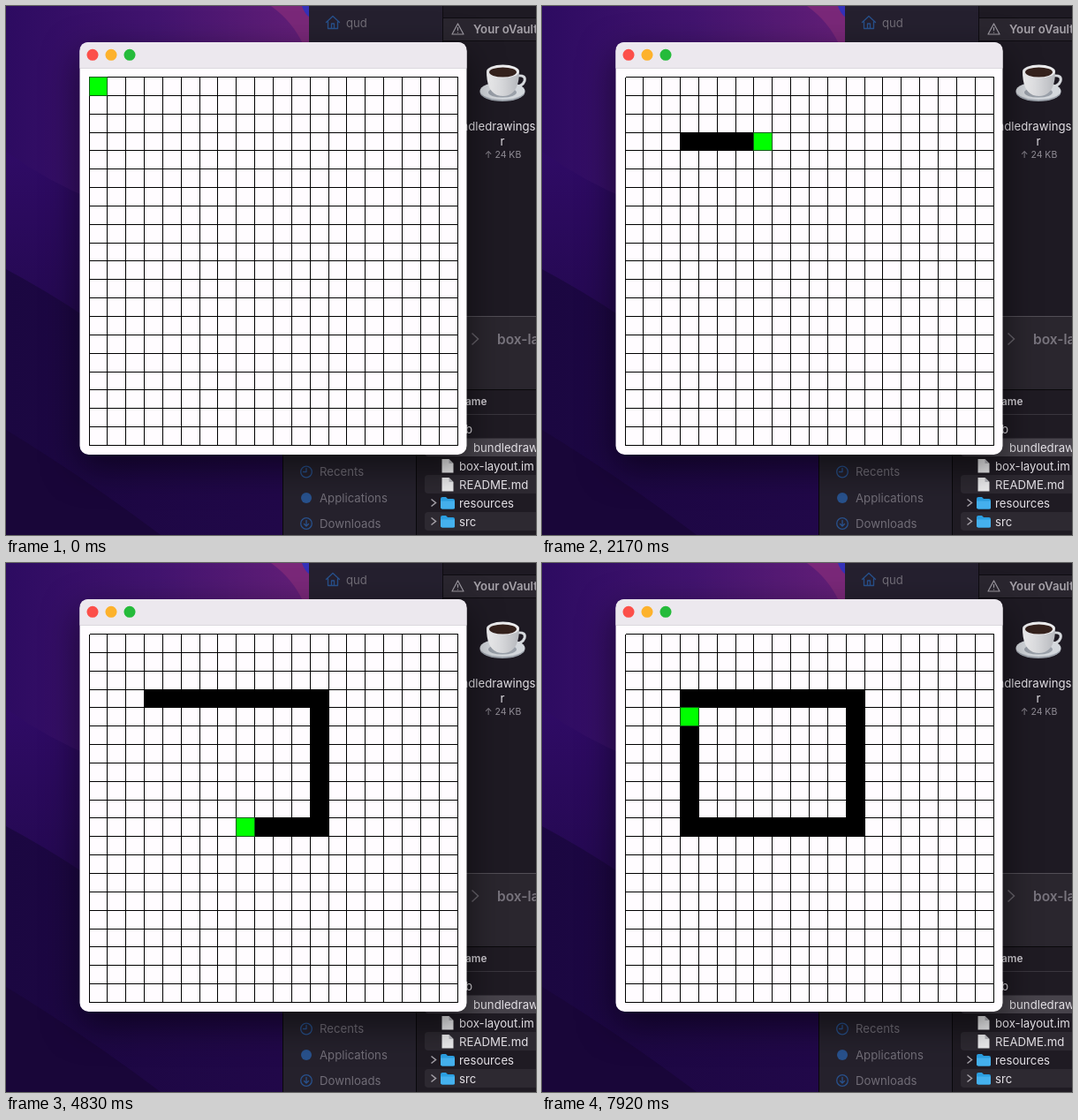
An HTML page for the animation above (8 s loop, 600 by 599 pixels).

```html
<!DOCTYPE html>
<html lang="en">
<head>
<meta charset="utf-8">
<title>Grid painter</title>
<style>
  html, body { margin: 0; width: 100%; height: 100%; overflow: hidden; background: #1b0838; }
  svg { display: block; width: 600px; height: 599px; }
  text { font: 13.2px Inter, sans-serif; fill: #e4e1e6; }
  .bold { font-weight: 600; }
  .dim { fill: #716d77; }
  .small { font-size: 10.5px; fill: #918d96; }
  .icon { fill: none; stroke: #28518c; stroke-width: 1.3; stroke-linejoin: round; stroke-linecap: round; }
  .window { fill: #fffcff; filter: drop-shadow(0 14px 20px rgba(0, 0, 0, .55)); }
  .crisp { shape-rendering: crispEdges; }
</style>
</head>
<body>
<svg viewBox="0 0 600 599">
  <defs>
    <linearGradient id="sky" x1="0" y1="0" x2="343" y2="0" gradientUnits="userSpaceOnUse">
      <stop offset="0" stop-color="#2d0b61"/>
      <stop offset=".5" stop-color="#42146f"/>
      <stop offset="1" stop-color="#641f78"/>
    </linearGradient>
    <linearGradient id="hill" x1="0" y1="150" x2="0" y2="420" gradientUnits="userSpaceOnUse">
      <stop offset="0" stop-color="#300b67"/>
      <stop offset="1" stop-color="#200849"/>
    </linearGradient>
    <linearGradient id="floor" x1="0" y1="0" x2="313" y2="0" gradientUnits="userSpaceOnUse">
      <stop offset="0" stop-color="#1b0741"/>
      <stop offset="1" stop-color="#210849"/>
    </linearGradient>
    <linearGradient id="cup" x1="0" y1="0" x2="1" y2="0">
      <stop offset="0" stop-color="#f6f6f7"/>
      <stop offset="1" stop-color="#b5b7bc"/>
    </linearGradient>
    <g id="page">
      <path d="M493.500 513h8l5 5v10.500h-13z" fill="#ececee"/>
      <path d="M501.500 513v5h5z" fill="#b9b9bf"/>
    </g>
    <g id="folder">
      <path d="M481.500 558.500l5 4-5 4" fill="none" stroke="#a5a1a8" stroke-width="1.500"/>
      <path d="M492 558q0-2 2-2h4l2 2h6q2 0 2 2v8q0 1.500-2 1.500h-12q-2 0-2-2z" fill="#2b9ee0"/>
      <path d="M492 560.500h16v7.500q0 1.500-2 1.500h-12q-2 0-2-2z" fill="#45b1ee"/>
    </g>
  </defs>

  <!-- wallpaper -->
  <rect width="600" height="599" fill="url(#sky)"/>
  <path d="M300 0h43v45h-6Q325 18 300 0z" fill="#7a2879"/>
  <path d="M335 0h9v13q-6-4-9-13z" fill="#3431b8"/>
  <path d="M0 165Q50 200 100 220V599H0z" fill="url(#hill)"/>
  <path d="M0 298Q45 322 90 352L330 520V599H0z" fill="url(#floor)"/>
  <path d="M0 480Q90 535 175 599H0z" fill="#190639"/>

  <!-- upper file window -->
  <rect x="343" width="151" height="351" fill="#25202f"/>
  <rect x="494" width="106" height="351" fill="#1e1a23"/>
  <rect x="494" y="13" width="106" height="26" fill="#2a262f"/>
  <path class="crisp" d="M494.500 0V351M494 13.500h106M494 39.500h106" stroke="#0e0c11"/>
  <path class="icon" d="M362.500 18.500l7.500-7 7.500 7M364.500 17.500v8h11v-8M368.500 25v-5h3v5"/>
  <text class="dim" x="385" y="24">qud</text>
  <path d="M511.500 20l6.500 12h-13z" fill="none" stroke="#9b979f" stroke-width="1.200" stroke-linejoin="round"/>
  <path d="M511.500 24v4M511.500 29.500v1" stroke="#9b979f" stroke-width="1.200"/>
  <text class="bold" x="529" y="31" style="fill:#a5a1a8">Your oVault</text>

  <!-- coffee cup -->
  <ellipse cx="562" cy="97.500" rx="25.500" ry="10.500" fill="#9ea4ad"/>
  <ellipse cx="562" cy="96" rx="25.500" ry="10" fill="#d3d7dc"/>
  <ellipse cx="562" cy="98" rx="16" ry="5.500" fill="#9aa0a9"/>
  <path d="M579 79q10-1 8 6-2 6-12 7" fill="none" stroke="#d5d8dc" stroke-width="3"/>
  <path d="M544 74q0 22 12 27 7 2 13 0 12-5 12-27z" fill="url(#cup)"/>
  <ellipse cx="562.500" cy="74" rx="18.500" ry="7.500" fill="#ececee"/>
  <ellipse cx="562.500" cy="75" rx="15.500" ry="5.500" fill="#35221d"/>
  <text x="599.500" y="141" text-anchor="end">ndledrawings</text>
  <text x="562" y="158" text-anchor="middle">r</text>
  <text class="small" x="562.500" y="172" text-anchor="middle">↑ 24 KB</text>

  <!-- lower file window -->
  <rect x="313" y="351" width="151" height="248" fill="#25212c"/>
  <rect x="464" y="351" width="136" height="248" fill="#1f1b23"/>
  <rect x="464" y="351" width="136" height="83" fill="#2a262e"/>
  <path class="crisp" d="M464 351.500h136" stroke="#524e56"/>
  <path class="crisp" d="M464.500 434v165M464 434.500h136M313.500 500v99" stroke="#09080b"/>
  <path class="crisp" d="M466 462.500h134" stroke="#3a363e"/>
  <path d="M527.500 370.500l7 6.500-7 6.500" fill="none" stroke="#66626a" stroke-width="1.500"/>
  <text class="bold" x="556" y="383" style="font-size:15.500px;fill:#78747d">box-layout</text>
  <text class="bold" x="520" y="452" style="font-size:11.800px;fill:#d2cfd5">ame</text>
  <rect x="474" y="489.500" width="140" height="20.500" rx="4" fill="#47434b"/>
  <rect x="474" y="531" width="140" height="21" rx="4" fill="#2d2931"/>
  <rect x="474" y="573" width="140" height="21" rx="4" fill="#2d2931"/>
  <text x="520" y="484">b</text>
  <text x="529" y="505">bundledrawings</text>
  <use href="#page"/>
  <text x="513" y="526">box-layout.im</text>
  <use href="#page" y="21"/>
  <text x="513" y="547">README.md</text>
  <use href="#folder"/>
  <text x="513" y="567.500">resources</text>
  <use href="#folder" y="21"/>
  <text x="513" y="588.500">src</text>

  <g class="icon">
    <circle cx="340" cy="527.500" r="6.300"/>
    <path d="M340 523.500v4h-3.500"/>
    <circle cx="340" cy="586" r="6.300"/>
    <path d="M340 582.500v6.500M337.500 586.500l2.500 2.500 2.500-2.500"/>
  </g>
  <circle cx="340" cy="557" r="6" fill="#28518c"/>
  <text class="dim" x="355" y="532">Recents</text>
  <text class="dim" x="355" y="561.500">Applications</text>
  <text class="dim" x="355" y="591">Downloads</text>

  <!-- painter window -->
  <rect class="window" x="83.500" y="41" width="438" height="467" rx="10"/>
  <path d="M83.500 70.500V51q0-10 10-10h418q10 0 10 10v19.500z" fill="#ece8ee"/>
  <path class="crisp" d="M84 70.500h437" stroke="#dcd8de"/>
  <circle cx="98" cy="55.300" r="6.500" fill="#fc4f4a"/>
  <circle cx="119" cy="55.300" r="6.500" fill="#fdb22c"/>
  <circle cx="140" cy="55.300" r="6.500" fill="#25bb3b"/>
  <path id="grid" class="crisp" fill="none" stroke="#000"/>
  <path id="trail" class="crisp"/>
  <path id="head" class="crisp" fill="#00ff00" stroke="#0a5a10"/>
</svg>
<script>
const LOOP = 8000, FIRST_STEP = 548, STEP = 1000 / 6;
const CELLS = 20, CELL_SIZE = 20.85, PEN_DOWN = 6;
const edgeX = i => Math.floor(94.02 + CELL_SIZE * i) + .5;
const edgeY = i => Math.floor(80.47 + CELL_SIZE * i) + .5;
const byId = id => document.getElementById(id);
const grid = byId('grid'), trail = byId('trail'), head = byId('head');

let lines = '';
for (let i = 0; i <= CELLS; i++) {
  lines += `M${edgeX(i)} ${edgeY(0)}V${edgeY(CELLS)}M${edgeX(0)} ${edgeY(i)}H${edgeX(CELLS)}`;
}
grid.setAttribute('d', lines);

// Every cell the cursor visits, in order.
const route = [[0, 0]];
for (const [dx, dy, count] of [[0, 1, 3], [1, 0, 12], [0, 1, 7], [-1, 0, 9], [0, -1, 6]]) {
  for (let i = 0; i < count; i++) {
    const [x, y] = route[route.length - 1];
    route.push([x + dx, y + dy]);
  }
}

const cellPath = ([x, y], grow = 0) =>
  `M${edgeX(x) - grow} ${edgeY(y) - grow}H${edgeX(x + 1) + grow}V${edgeY(y + 1) + grow}H${edgeX(x) - grow}z`;

function draw(now) {
  const time = now % LOOP;
  const steps = Math.floor((time - FIRST_STEP) / STEP) + 1;
  const index = Math.max(0, Math.min(route.length - 1, steps));
  trail.setAttribute('d', route.slice(PEN_DOWN, index).map(cell => cellPath(cell, .5)).join(''));
  head.setAttribute('d', cellPath(route[index]));
  requestAnimationFrame(draw);
}
draw(performance.now());
</script>
</body>
</html>
```
